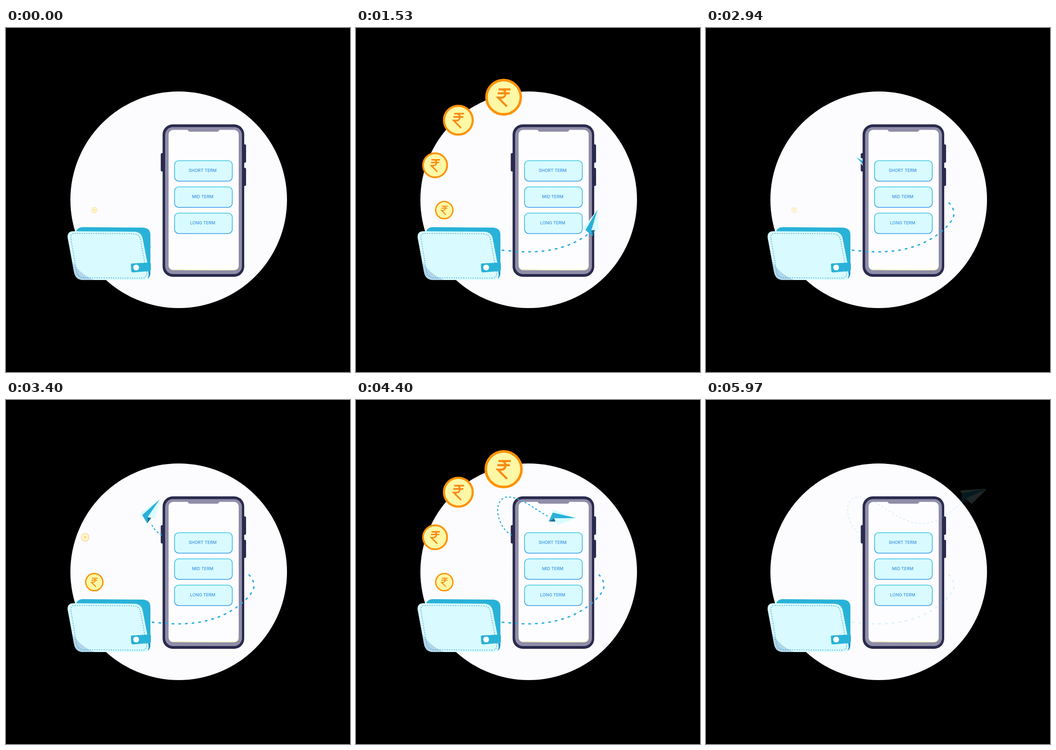
Recreate the animation shown at these times as an HTML page. Size 748 by 748 pixels, loop 6 s.

```html
<!DOCTYPE html>
<html lang="en">
<head>
<meta charset="utf-8">
<title>Wallet to phone</title>
<style>
  html, body { margin: 0; width: 100%; height: 100%; overflow: hidden; background: #000; }
  svg { display: block; width: 100vw; height: 100vh; }
  text { font: 500 9.3px Inter, "Open Sans", sans-serif; fill: #3c93e2; text-anchor: middle; }
  .trail { fill: none; stroke: #2aaee0; stroke-linecap: round; }
</style>
</head>
<body>
<svg viewBox="0 0 748 748">
  <defs>
    <linearGradient id="edge" x1="0" y1="0" x2="0" y2="1">
      <stop offset="0" stop-color="#35c3df"/>
      <stop offset="1" stop-color="#2f97e4"/>
    </linearGradient>
    <mask id="reveal" maskUnits="userSpaceOnUse" x="0" y="0" width="748" height="748">
      <path id="route" fill="none" stroke="#fff" stroke-width="14"/>
    </mask>
    <path id="rupee" d="M-11 -17H15M-13 -8.5H13M-11 -17H-4C7 -17 7 1 -5 1H-12L7 20"
      fill="none" stroke="#f98a12" stroke-width="4.4"/>
    <g id="ring">
      <circle r="37.3" fill="#fef8a6" stroke="#ff9104" stroke-width="5.4"/>
    </g>
  </defs>

  <rect width="748" height="748"/>
  <circle cx="375.5" cy="373.5" r="235.5" fill="#fcfcfe"/>

  <g fill="#2a2a4e">
    <rect x="336.5" y="272" width="9" height="40" rx="3"/>
    <rect x="513" y="253" width="9" height="40" rx="3"/>
    <rect x="513" y="304" width="9" height="39.5" rx="3"/>
  </g>
  <g id="back"></g>

  <g id="phone">
    <rect x="340.5" y="209.5" width="177.5" height="331.5" rx="22" fill="#2a2a4e"/>
    <rect x="346" y="215.5" width="167" height="319.5" rx="17" fill="#8f8da8"/>
    <rect x="353.5" y="221.5" width="152.5" height="305" rx="10" fill="#fdfdff"/>
    <path d="M362 525Q430 527 497 526Q505 525 505.500 517" fill="none" stroke="#f3efb0" stroke-width="1.500"/>
    <path d="M395 221H464Q463 225.500 458 225.500H401Q396 225.500 395 221Z" fill="#8f8da8"/>
    <g id="options"></g>
  </g>

  <g id="front">
    <g id="trails" mask="url(#reveal)">
      <path id="low" class="trail" stroke-width="3" stroke-dasharray="3.5 11"/>
      <path id="high" class="trail" stroke-width="2.3" stroke-dasharray="2.6 6.4"/>
    </g>
    <g id="plane">
      <path d="M0 0L-52.500 -16.900L-51 -9.900Z" fill="#d9fbff"/>
      <path d="M0 0L-51 -9.900L-58.900 9.600L-47.400 2.400Z" fill="#28b1da"/>
      <path d="M-47.400 2.400L-58.900 9.600L-44 9.500Z" fill="#1c6f95"/>
      <path d="M0 0L-47.400 2.400L-40.300 17.100Z" fill="#d9fbff"/>
    </g>
  </g>

  <g id="wallet">
    <path d="M153 441Q157 433 167 433L298 434Q314 435 314 450V535Q312 547 300 547L180 530Z" fill="#29b2d8"/>
    <path id="flap" d="M134 456Q133 442 146 442L280 443Q294 444 297 457L312 535Q312 547 300 548H167Q151 547 148 531Z" fill="#d9fbff"/>
    <path d="M143 505Q158 534 192 548H167Q151 547 148 531Z" fill="#b1d6ea"/>
    <path d="M141 457Q140 447 149 446.500L276 447.500Q289 448 292 459L306 533Q306 543 297 544L168 543Q156 542 153.500 530Z"
      fill="none" stroke="#3aa0d6" stroke-width="1.300" stroke-dasharray="2.5 2.6"/>
    <path d="M313 528L313 536Q312 543 308 545Q312 538 309 529Z" fill="#2390c8"/>
    <path d="M274 512L312 510Q315 510 315 513V525Q315 528 312 528.500L276 531.500Q273 531.500 272.500 528.500L271.500 515Q271.500 512 274 512Z" fill="#29b2d8"/>
    <circle cx="283" cy="520.700" r="6.300" fill="#fff"/>
  </g>
  <g id="coins"></g>
</svg>

<script>
const LOOP = 6000, COIN_LOOP = 3000;
const $ = id => document.getElementById(id);

function add(parent, tag, attrs, text = "") {
  const el = document.createElementNS("http://www.w3.org/2000/svg", tag);
  for (const name in attrs) el.setAttribute(name, attrs[name]);
  el.textContent = text;
  return parent.appendChild(el);
}

// Linear interpolation in a list of [time, value].
function track(keys, t) {
  if (t <= keys[0][0]) return keys[0][1];
  for (let i = 1; i < keys.length; i++) {
    const [t0, v0] = keys[i - 1], [t1, v1] = keys[i];
    if (t < t1) return v0 + (v1 - v0) * (t - t0) / (t1 - t0);
  }
  return keys[keys.length - 1][1];
}

["SHORT TERM", "MID TERM", "LONG TERM"].forEach((label, i) => {
  const y = 288.5 + i * 57;
  add($("options"), "rect", { x: 366.5, y, width: 125.5, height: 44.5, rx: 9,
    fill: "#d9fbff", stroke: "url(#edge)", "stroke-width": 1.5 });
  add($("options"), "text", { x: 427.7, y: y + 24.5 }, label);
});

// Flight: out of the wallet, behind the phone, round its top left corner and away.
const lowCurve = "C345 486 370 488 395 486C440 483 475 470 505 448C530 429 541 412 539 401C538 391 531 382 523 375";
const highCurve = "C322 286 307 260 308 237C309 220 320 210 332 211C375 213 415 268 470 269C505 269 535 240 558 222";
const route = $("route");
$("low").setAttribute("d", "M318 483" + lowCurve);
$("high").setAttribute("d", "M338 293" + highCurve);
route.setAttribute("d", "M265 473C285 477 300 481 318 483" + lowCurve +
  "C480 345 390 312 338 293" + highCurve + "C568 214 580 209 640 186");
const total = route.getTotalLength();

function lengthAt(x, y) {
  let best = 0, least = Infinity;
  for (let s = 0; s <= total; s++) {
    const p = route.getPointAtLength(s), d = Math.hypot(p.x - x, p.y - y);
    if (d < least) { least = d; best = s; }
  }
  return best;
}

const flight = [
  [0, 270, 474], [870, 431, 482], [1530, 515, 441], [2940, 368, 303],
  [3800, 341, 211], [5170, 549, 229], [5420, 566, 217]
].map(([t, x, y]) => [t, lengthAt(x, y)]);
const hideFrom = lengthAt(538, 411), hideTo = lengthAt(308, 240);

function drawPlane(t) {
  const s = track(flight, t);
  const p = route.getPointAtLength(s);
  const a = route.getPointAtLength(s + 35), b = route.getPointAtLength(s + 41);
  const angle = Math.atan2(b.y - a.y, b.x - a.x) * 180 / Math.PI;
  const size = track([[5170, 1], [5420, 1.08]], t);
  const fade = track([[5800, 1], [6000, 0]], t);
  const plane = $("plane");
  const layer = s > hideFrom && s < hideTo ? $("back") : $("front");
  if (plane.parentNode !== layer) layer.append(plane);
  plane.setAttribute("transform",
    `translate(${p.x} ${p.y}) rotate(${angle}) scale(${size}) translate(47 -5)`);
  plane.setAttribute("opacity", fade);
  $("trails").setAttribute("opacity", fade);
  route.setAttribute("stroke-dasharray", `${Math.max(0, s - 12)} 9999`);
}

// Coins pop in from the wallet upward and pop out in reverse order.
const coins = [[192, 396, 20], [172, 298.5, 28], [222.5, 200.5, 33.5], [321, 150.5, 40]]
  .map(([x, y, r], i) => {
    const start = i * 400 - 5, end = 2960 - i * 140;
    const g = add($("coins"), "g", { transform: `translate(${x} ${y}) scale(${r / 40})` });
    const ghost = add(g, "use", { href: "#ring", opacity: 0.5 });
    const body = add(g, "g", {});
    add(body, "use", { href: "#ring" });
    add(body, "use", { href: "#rupee" });
    return { g, ghost, body, end, keys: [
      [start, 0], [start + 65, 1], [start + 110, 1.2], [start + 230, 1],
      [end - 200, 1], [end - 130, 1.2], [end - 60, 1], [end, 0]
    ] };
  });

function drawCoins(t) {
  for (const { g, ghost, body, end, keys } of coins) {
    const size = track(keys, t);
    body.setAttribute("transform", `scale(${size})`);
    ghost.setAttribute("transform", `scale(${track(keys, t + 15)})`);
    g.setAttribute("opacity", t > end - 60 ? Math.min(1, size) : 1);
    g.setAttribute("visibility", size > 0 ? "visible" : "hidden");
  }
}

const began = performance.now();
function frame() {
  const t = (performance.now() - began) % LOOP;
  drawPlane(t);
  drawCoins(t % COIN_LOOP);
  requestAnimationFrame(frame);
}
frame();
</script>
</body>
</html>
```
